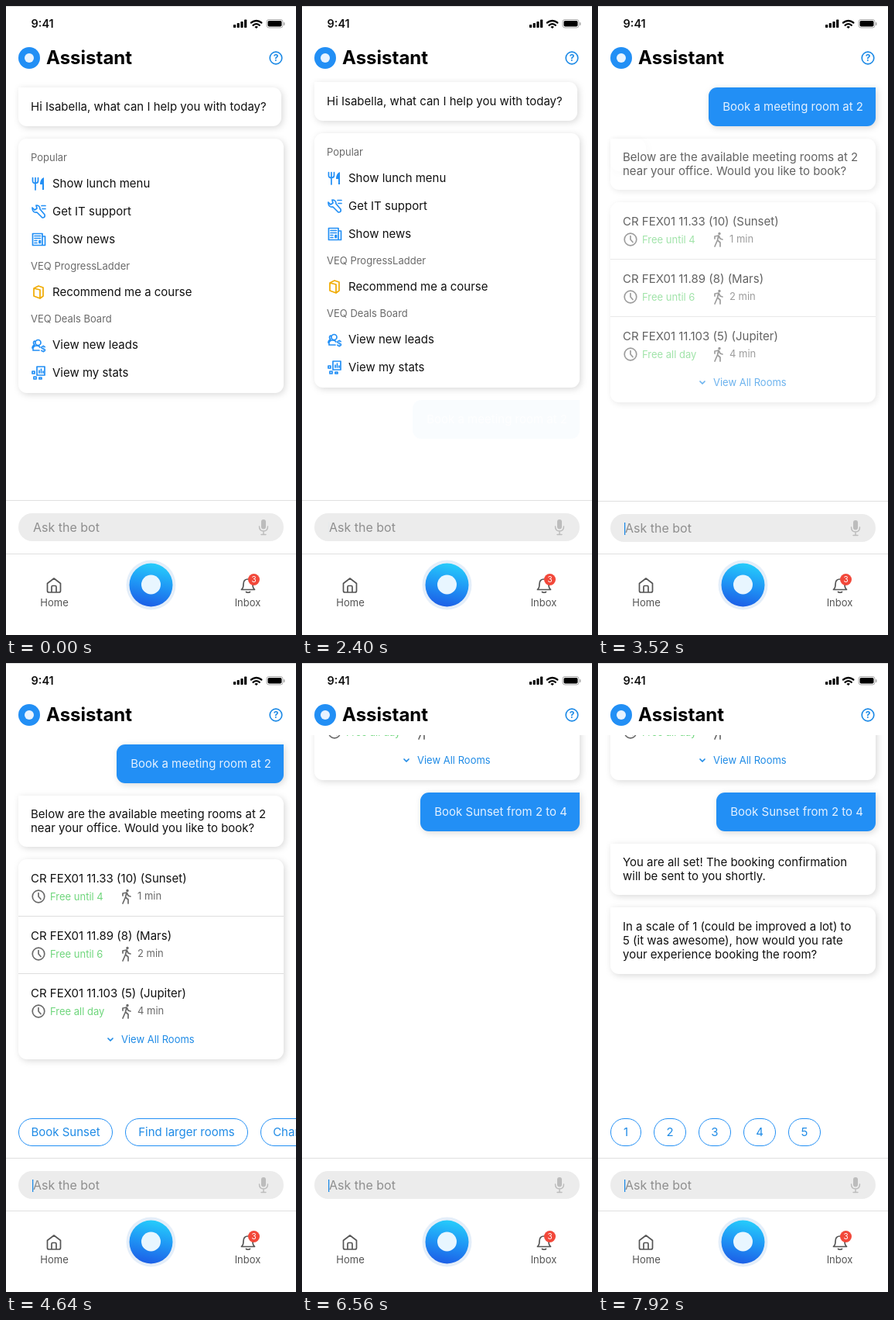
An HTML page that plays this animation: 375x811 px, repeating every 8000 ms.

```html
<!DOCTYPE html>
<html lang="en">
<head>
<meta charset="utf-8">
<title>Assistant chat</title>
<style>
  html, body { margin: 0; width: 100%; height: 100%; overflow: hidden; background: #fff; }
  svg { display: block; }
  text { font-family: Inter, sans-serif; font-optical-sizing: none; white-space: pre; }
  .card { filter: drop-shadow(2px 2px 4px rgba(0, 0, 0, .15)); }
  .line { fill: none; stroke-width: 1.7; stroke-linejoin: round; stroke-linecap: round; }
</style>
</head>
<body>
<svg id="stage" width="375" height="811" viewBox="0 0 375 811"></svg>
<script>
const BLUE = '#228ff5', LINK = '#1f8be6', GREY = '#6a6a6a', DARK = '#555';

const text = (x, y, s, size = 15, fill = '#111', more = '') =>
  `<text x="${x}" y="${y}" font-size="${size}" fill="${fill}" ${more}>${s}</text>`;
const lines = (x, y, list) => list.map((s, i) => text(x, y + i * 18, s)).join('');
const rect = (x, y, w, h, fill, r = 0) =>
  `<rect x="${x}" y="${y}" width="${w}" height="${h}" rx="${r}" fill="${fill}"/>`;
const circle = (x, y, r, fill) => `<circle cx="${x}" cy="${y}" r="${r}" fill="${fill}"/>`;
const line = (d, color = BLUE, more = '') => `<path class="line" stroke="${color}" d="${d}" ${more}/>`;
const group = (id, body) => `<g id="${id}">${body}</g>`;
const at = (x, y, body) => `<g transform="translate(${x} ${y})">${body}</g>`;

const card = (x, y, w, h, squareX = null, fill = '#fff') =>
  `<g class="card">${rect(x, y, w, h, fill, 11)}${squareX === null ? '' : rect(squareX, y, 14, 14, fill)}</g>`;
const bubble = (y, w, h) => card(16, y, w, h, 16);
const userMessage = (x, y, s) =>
  card(x, y, 359 - x, 50, 345, BLUE) + text(343, y + 30, s, 15, '#e4f1ff', 'text-anchor="end"');
const typing = y => bubble(y, 46, 42) + text(32, y + 26, '...');
const chip = (x, w, s) =>
  `<rect x="${x + .5}" y="587.5" width="${w - 1}" height="35" rx="17.5" fill="#fff" stroke="${BLUE}"/>` +
  text(x + w / 2, 610, s, 15, LINK, 'text-anchor="middle"');

// Menu icons are drawn around their own centre.
const icons = {
  lunch: line('M-7.5-7.5v4q0 3 3.5 3t3.5-3v-4M-4-7.5V8') +
    `<path fill="${BLUE}" d="M7-8V8H5V1H2Q2-6 7-8"/>`,
  tools: line('M-8-5L-5-2-2-4-3-8Q2-8 2-3L8 4Q9 8 5 8L-2 1Q-8 2-8-5M4-7.500H9M5-3.500H9'),
  news: line('M-7.5-7.5H5V7.5H-7.5ZM5-4H8.5V7.5H5M-5-4.5H2.5M-5-1.5H2.5M-5 1.5H-2M-5 4.5H-2M1 1.5H2.5V4.5H1Z'),
  course: line('M-6-5L2-3V8L-6 5ZM-6-5L0-8 6-6V5L2 8', '#f0ab00'),
  leads: line('M-4-3a3.5 3.5 0 1 1 7 0a3.5 3.5 0 1 1-7 0M-7 7Q-8 1-2 1Q1 1 2 3M-7 7H1M-5-5Q-8-3-5 0Q-8 1-8 4') +
    text(2.5, 9, '$', 11, BLUE, 'font-weight="700"'),
  stats: line('M-2-8H8V3H-2ZM1 0V-3M3.5 0V-5M6 0V-2M-8-2H-5V1H-8ZM-6 5H-3V8H-6ZM1 6H4V8H1Z')
};
const item = (y, icon, s) => at(42, y, icons[icon]) + text(60, y + 5, s);
const heading = (y, s) => text(32, y, s, 13, GREY);

const room = (y, name, free, walk) => text(32, y, name) +
  at(42, y + 18, line('M-7.8 0a7.8 7.8 0 1 1 15.6 0a7.8 7.8 0 1 1-15.6 0M0-4.5V0L3 3.5', GREY)) +
  text(57, y + 23, free, 13, '#6fd67c') +
  at(156, y + 18, circle(1, -7.5, 1.7, GREY) +
    line('M-5-1V-4L0-5 2-1 5 0M0-5L-1.5 1 2 4V9M-2 2L-5 9', GREY)) +
  text(170, y + 22, walk, 13, GREY);

const welcome = bubble(105, 340, 50) + text(32, 135, 'Hi Isabella, what can I help you with today?') +
  card(16, 171, 343, 328) + heading(200, 'Popular') +
  item(229, 'lunch', 'Show lunch menu') + item(265, 'tools', 'Get IT support') +
  item(301, 'news', 'Show news') + heading(340, 'VEQ ProgressLadder') +
  item(369, 'course', 'Recommend me a course') + heading(408, 'VEQ Deals Board') +
  item(437, 'leads', 'View new leads') + item(473, 'stats', 'View my stats');

const rooms = bubble(171, 343, 66) +
  lines(32, 200, ['Below are the available meeting rooms at 2', 'near your office. Would you like to book?']) +
  card(16, 253, 343, 258) +
  room(283, 'CR FEX01 11.33 (10) (Sunset)', 'Free until 4', '1 min') +
  room(357, 'CR FEX01 11.89 (8) (Mars)', 'Free until 6', '2 min') +
  room(431, 'CR FEX01 11.103 (5) (Jupiter)', 'Free all day', '4 min') +
  rect(16, 326, 343, 1, '#dedede') + rect(16, 400, 343, 1, '#dedede') +
  line('M132 484l3 3 3-3', LINK) + text(149, 490, 'View All Rooms', 13, LINK);

const rating = bubble(233, 343, 66) +
  lines(32, 262, ['You are all set! The booking confirmation', 'will be sent to you shortly.']) +
  bubble(315, 343, 86) +
  lines(32, 345, ['In a scale of 1 (could be improved a lot) to', '5 (it was awesome), how would you rate',
    'your experience booking the room?']);

const header = rect(0, 0, 375, 93, '#fff') + rect(0, 0, 375, 1, '#dcdcdc') +
  text(32.5, 28, '9:41', 14.5, '#111', 'font-weight="600"') +
  [4, 6, 8, 10.5].map((h, i) => rect(294 + i * 4.7, 28 - h, 3.2, h, '#000', .8)).join('') +
  line('M317 21.5q6.7-5 13.4 0M319.5 24.8q4.2-3.4 8.4 0', '#000', 'style="stroke-width:2.2"') +
  '<path d="M321.4 27l2.3 2 2.3-2q-2.3-1.8-4.6 0"/>' +
  '<rect x="337" y="17.5" width="21" height="10.5" rx="3" fill="none" stroke="#aaa"/>' +
  rect(338.5, 19, 18, 7.5, '#000', 1.8) + rect(359, 21, 1.5, 4, '#aaa', .7) +
  circle(30, 67, 14, BLUE) + circle(30, 67, 6, '#e8f3ff') +
  text(52, 75, 'Assistant', 24, '#000', 'font-weight="700"') +
  line('M341.2 67a7.8 7.8 0 1 1 15.6 0a7.8 7.8 0 1 1-15.6 0', LINK) +
  text(349, 71.2, '?', 12, LINK, 'font-weight="700" text-anchor="middle"');

const input = rect(0, 637, 375, 1, '#e0e0e0') + rect(16, 654, 343, 36, '#ececec', 18) +
  text(35, 678, 'Ask the bot', 16, '#8e8e8e') +
  group('cursor', rect(34, 665, 1.3, 16, LINK)) +
  rect(330, 662, 6, 12.5, '#bcbcbc', 3) +
  line('M327.5 671q0 6 5.5 6t5.5-6M333 677v4M330 681.5h6', '#bcbcbc', 'style="stroke-width:1.4"');

const tabs = group('tabLine', rect(0, 706, 375, 1, '#e0e0e0')) +
  line('M53.5 744.5L62 738l8.5 6.5V754q0 2-2 2H55.5q-2 0-2-2ZM59 756v-7q0-1.5 1.5-1.5h3q1.5 0 1.5 1.5v7', DARK) +
  text(62.5, 774, 'Home', 13, DARK, 'text-anchor="middle"') +
  circle(187.5, 746.5, 32, '#e4eef9') + circle(187.5, 746.5, 28, 'url(#glow)') +
  circle(187.5, 746, 12.5, '#e8f6ff') +
  line('M304.5 752.5q2.5-2 2.5-7q0-6.5 6-6.5t6 6.5q0 5 2.5 7ZM310.5 755.5q2.5 1.5 5 0', DARK) +
  circle(320.5, 739.5, 7.5, '#f2483a') + text(320.5, 743.2, '3', 10, '#fff', 'text-anchor="middle"') +
  text(312.5, 774, 'Inbox', 13, DARK, 'text-anchor="middle"');

document.getElementById('stage').innerHTML =
  '<linearGradient id="glow" x1=".6" y1="0" x2=".4" y2="1"><stop stop-color="#26cdfb"/>' +
  '<stop offset=".5" stop-color="#1f96f5"/><stop offset="1" stop-color="#1c5ee6"/></linearGradient>' +
  group('welcome', welcome) +
  group('ask', userMessage(143, 105, 'Book a meeting room at 2')) +
  group('wait1', typing(171)) + group('rooms', rooms) +
  group('chips1', chip(16, 122, 'Book Sunset') + chip(154, 159, 'Find larger rooms') + chip(329, 122, 'Change time')) +
  group('book', userMessage(153, 167, 'Book Sunset from 2 to 4')) +
  group('wait2', typing(233)) + group('rating', rating) +
  group('chips2', chip(16, 40, 1) + [2, 3, 4, 5].map((n, i) => chip(72 + i * 58, 42, n)).join('')) +
  header + group('input', input) + tabs;

const fade = (t, from, to) => Math.min(1, Math.max(0, (t - from) / (to - from)));
const ease = (t, start) => {
  const u = fade(t, start - 34, start + 171);
  return u < .5 ? 4 * u ** 3 : 1 - 4 * (1 - u) ** 3;
};
const pose = (id, opacity, y = 0) => {
  const el = document.getElementById(id);
  el.setAttribute('opacity', opacity);
  el.setAttribute('visibility', opacity ? 'visible' : 'hidden');
  el.setAttribute('transform', `translate(0 ${Math.round(y)})`);
};

function draw(now) {
  const t = Math.floor(now % 8000 / 80) * 80;   // the picture advances in 80 ms steps
  const asked = ease(t, 2400), listed = ease(t, 3440);
  const booked = ease(t, 6400), rated = ease(t, 7520);
  pose('welcome', asked < 1 ? 1 : 0, -410 * asked);
  pose('ask', booked < 1 ? asked : 0, 410 * (1 - asked) - 110 * booked);
  pose('wait1', fade(t, 2560, 2800) * (1 - listed));
  pose('rooms', listed, -360 * booked);
  pose('chips1', fade(t, 3520, 3840) * (1 - booked));
  pose('book', booked, 360 * (1 - booked));
  pose('wait2', fade(t, 6560, 6880) * (1 - rated));
  pose('rating', rated);
  pose('chips2', fade(t, 7600, 7920));
  pose('input', 1, asked);
  pose('cursor', asked);
  pose('tabLine', t >= 6400 && t < 7520 ? 0 : 1);
  requestAnimationFrame(draw);
}
draw(0);
</script>
</body>
</html>
```
